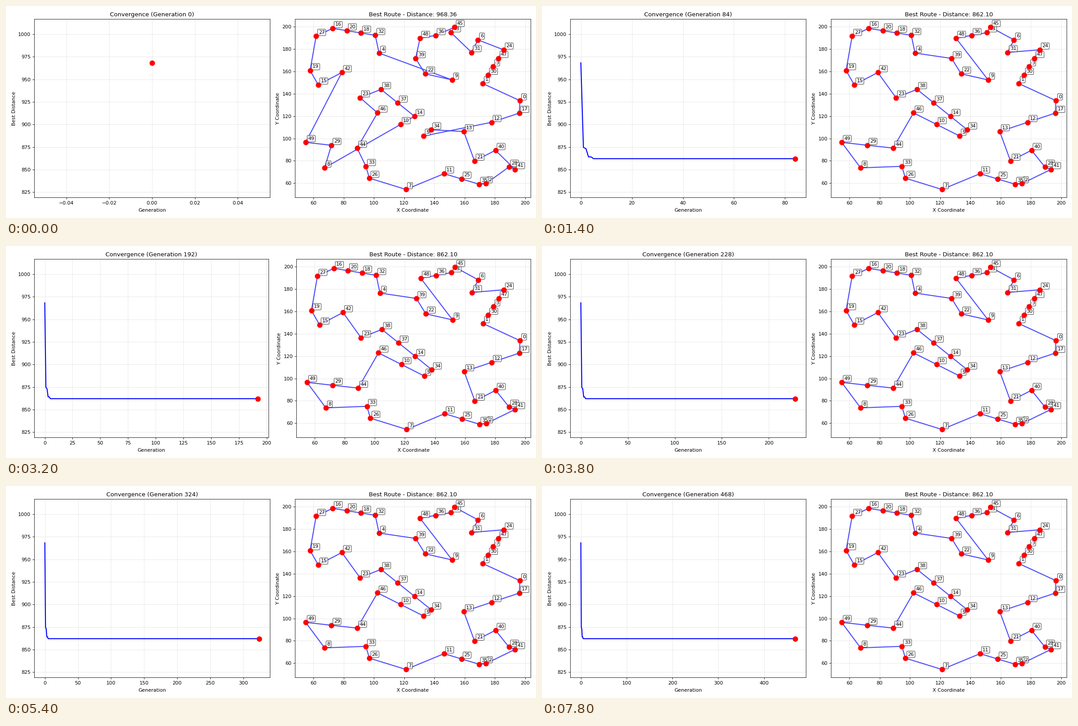
Write a matplotlib script that moves like this. It is 1183 px wide and 473 px high and loops after 8000 ms.

```python
import numpy as np
import matplotlib.pyplot as plt
from matplotlib.animation import FuncAnimation

FRAMES, INTERVAL, GENS_PER_FRAME = 40, 200, 12
WIDTH, HEIGHT, DPI = 1183, 473, 78.867
LEFT, RIGHT, TOP, BOTTOM, GAP = 62.8, 1171.2, 29.3, 427.4, 56  # pixels
DIGIT = 0.318 * 10 * DPI / 72  # half the width of a tick digit

# Corners of the best route; further cities on a leg are spaced evenly along it
legs = [
    ("0", 196.6, 133.8), ("17 12", 196.1, 122.7), ("13", 159.4, 106.2),
    ("21", 166.5, 79.9), ("40", 180.4, 89.4), ("28", 189.3, 74.5),
    ("41", 193.3, 72.3), ("2", 174.1, 59.7), ("35 25", 169.5, 59.1),
    ("11", 146.4, 68.5), ("7", 121.2, 54.4), ("26", 97.0, 64.5),
    ("33", 94.7, 75.1), ("8", 67.4, 73.7), ("49 29", 54.9, 96.5),
    ("44", 88.9, 91.4), ("46 10", 102.4, 122.9), ("5", 132.9, 102.2),
    ("34 14 37", 137.9, 107.8), ("38", 104.7, 143.9), ("23", 90.8, 136.5),
    ("42", 78.8, 159.0), ("15", 63.2, 148.0), ("19", 57.8, 160.8),
    ("27", 61.8, 191.5), ("16 20 18", 72.7, 198.5), ("32", 100.9, 192.3),
    ("4", 103.4, 176.4), ("39", 127.6, 171.6), ("22", 133.9, 157.8),
    ("9", 151.7, 152.4), ("48 36", 130.5, 189.7), ("43", 151.0, 194.7),
    ("45", 153.4, 199.5), ("6", 168.8, 188.2), ("31", 164.6, 177.0),
    ("24 47 3 30", 185.8, 179.3), ("1", 171.9, 149.2),
]
names, corners = [], []
for leg, *_ in legs:
    corners.append(len(names))
    names += leg.split()
count = len(names)
cities = np.column_stack([
    np.interp(range(count), corners, [leg[axis] for leg in legs], period=count)
    for axis in (1, 2)])

# 2-opt reversals that lead from the best route back to the first one
best_tour = list(range(count))
first_tour = best_tour[:]
for i, j in [(3, 23), (5, 23), (3, 5), (17, 27), (17, 24), (19, 24), (24, 27),
             (25, 27), (8, 10), (36, 39), (41, 43), (43, 45)]:
    first_tour[i:j] = first_tour[i:j][::-1]

# Best distance per generation; flat after the last drop
history = np.full((FRAMES - 1) * GENS_PER_FRAME + 1, 862.10)
history[:5] = 968.36, 874.6, 873.2, 864.1, 864.1

fig, (ax_conv, ax_route) = plt.subplots(
    1, 2, figsize=((WIDTH + 0.005) / DPI, (HEIGHT + 0.005) / DPI), dpi=DPI)


def style(ax, xlabel, ylabel):
    ax.set_xlabel(xlabel, labelpad=5)
    ax.set_ylabel(ylabel)
    ax.grid(True, alpha=0.3)


style(ax_conv, "Generation", "Best Distance")
style(ax_route, "X Coordinate", "Y Coordinate")

curve, = ax_conv.plot([], [], "b-", linewidth=2)
head, = ax_conv.plot([], [], "ro", markersize=10)
ax_conv.set_ylim(history.min() * 0.95, history.max() * 1.05)

route, = ax_route.plot(*cities.T, "b-", linewidth=2, alpha=0.7)
ax_route.scatter(*cities.T, c="red", s=100, zorder=5)
for name, city in sorted(zip(names, cities), key=lambda item: int(item[0])):
    ax_route.annotate(
        name, city, xytext=(5, 5), textcoords="offset points", fontsize=10,
        bbox=dict(boxstyle="round,pad=0.2", facecolor="white", alpha=0.7))


def lay_out(gap):
    width = (RIGHT - LEFT - gap) / 2
    fig.subplots_adjust(left=LEFT / WIDTH, right=RIGHT / WIDTH, wspace=gap / width,
                        top=1 - TOP / HEIGHT, bottom=1 - BOTTOM / HEIGHT)
    return width


def update(frame):
    gen = frame * GENS_PER_FRAME
    curve.set_data(np.arange(gen + 1), history[:gen + 1])
    head.set_data([gen], [history[gen]])
    margin = 0.05 * gen if gen else 0.055
    end = gen + margin
    ax_conv.set_xlim(-margin, end)
    ax_conv.set_title(f"Convergence (Generation {gen})")

    tour = best_tour if gen else first_tour
    route.set_data(*cities[tour + tour[:1]].T)
    ax_route.set_title(f"Best Route - Distance: {history[gen]:.2f}")

    # Widen the gap when the last tick label sticks out of the axes
    width = lay_out(GAP)
    if gen:
        tick = max(t for t in ax_conv.get_xticks() if t <= end)
        room = (end - tick) / (gen + 2 * margin) * width
        lay_out(GAP + max(0, DIGIT * len(f"{tick:g}") - room))
    return curve, head, route


anim = FuncAnimation(fig, update, frames=FRAMES, init_func=lambda: (),
                     interval=INTERVAL, repeat=True, repeat_delay=0)
plt.show()
```
